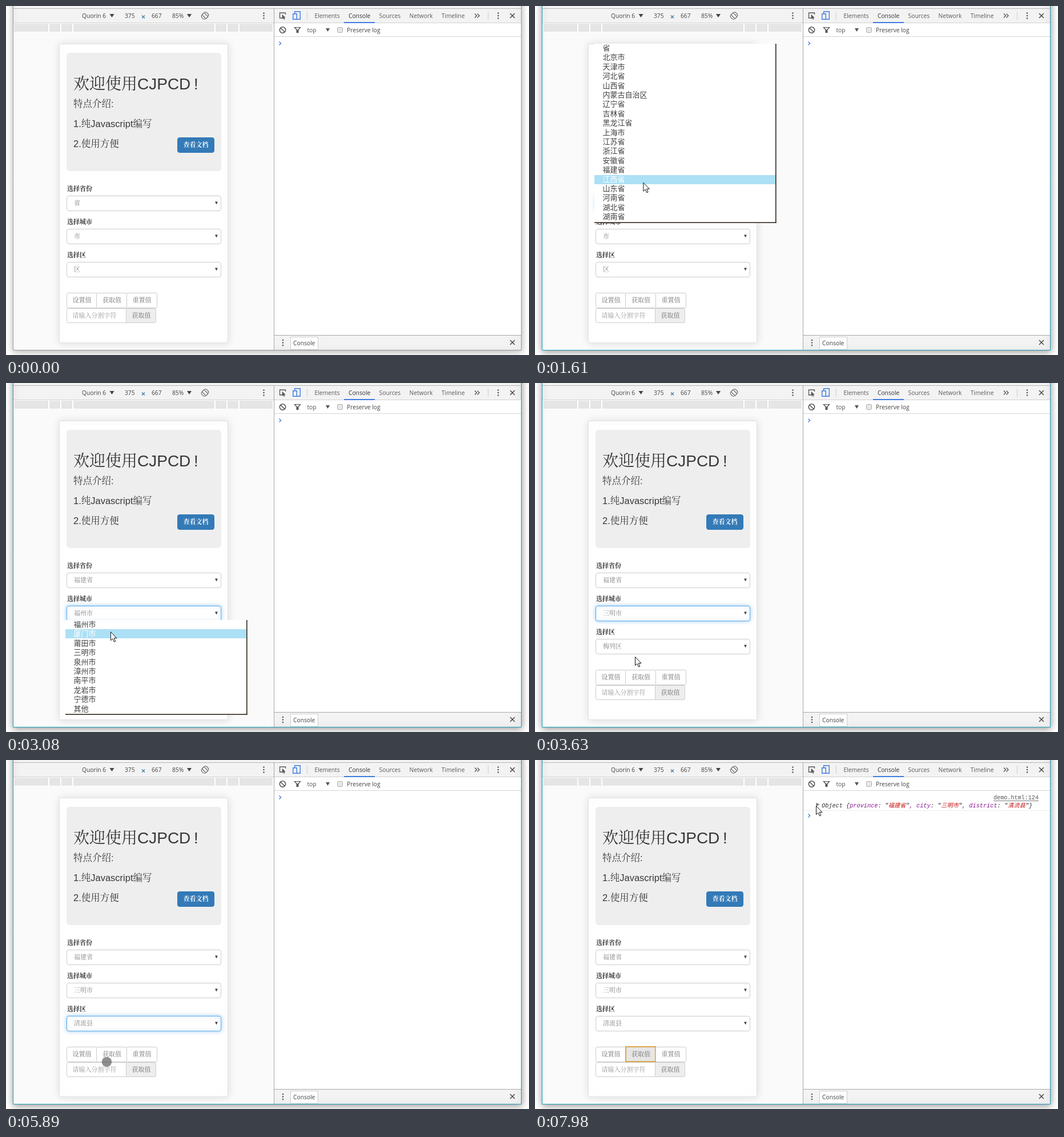
These frames come from a looping animation (916 by 611 pixels, 8 s). An HTML page with a canvas:

```html
<!DOCTYPE html>
<html lang="zh">
<head>
<meta charset="utf-8">
<title>CJPCD demo</title>
<style>
html, body { margin: 0; width: 100%; height: 100%; overflow: hidden; background: #fff; }
canvas { display: block; }
</style>
</head>
<body>
<canvas id="stage" width="916" height="611"></canvas>
<script>
const ctx = document.getElementById('stage').getContext('2d');
const LOOP = 8000, ROW = 16.4, GREY = '#555', BLUE = '#3f7be0';
const UI = '"Open Sans", "Noto Sans", sans-serif';
const PAGE = '"Liberation Sans", "Noto Serif CJK SC", "Noto Sans CJK SC", sans-serif';
const LIST = '"Noto Sans CJK SC", sans-serif';
const MONO = '"Liberation Mono", "Noto Sans CJK SC", monospace';

// Each select is focused, shows its list after a short delay, and closes when an option is picked.
const fields = [
  { label: '选择省份', focus: 920, pick: 2080, top: 66, textDelay: 240,
    values: ['省', '福建省', '福建省', '福建省'],
    items: '省 北京市 天津市 河北省 山西省 内蒙古自治区 辽宁省 吉林省 黑龙江省 上海市 江苏省 浙江省 安徽省 福建省 江西省 山东省 河南省 湖北省 湖南省' },
  { label: '选择城市', focus: 2910, pick: 3630, top: 415, textDelay: 0,
    values: ['市', '福州市', '三明市', '三明市'],
    items: '福州市 厦门市 莆田市 三明市 泉州市 漳州市 南平市 龙岩市 宁德市 其他' },
  { label: '选择区', focus: 4480, pick: 5030, top: 264, textDelay: 0,
    values: ['区', '鼓楼区', '梅列区', '清流县'],
    items: '梅列区 三元区 永安市 明溪县 将乐县 大田县 宁化县 建宁县 沙县 尤溪县 清流县 泰宁县 其他' }
];
const ENTER = 70, GET_VALUE = 6820, OPEN_DELAY = 80;

// Pointer glides: start, end, x, y
const glides = [
  [ENTER, 840, 188, 360], [920, 1170, 184, 353], [1250, 1840, 192, 288], [2080, 2380, 188, 408],
  [2910, 3310, 175, 480], [3770, 4240, 177, 456], [4480, 4860, 176, 431], [5030, 5570, 278, 526],
  [5740, 5890, 176.5, 528.5], [5980, 6270, 181, 520], [7290, 7980, 492, 81]
];

function fill(x, y, w, h, color) {
  ctx.fillStyle = color;
  ctx.fillRect(x, y, w, h);
}

function box(x, y, w, h, radius, color, border, weight = 1) {
  ctx.beginPath();
  ctx.roundRect(x + weight / 2, y + weight / 2, w - weight, h - weight, radius);
  ctx.fillStyle = color;
  ctx.fill();
  ctx.strokeStyle = border;
  ctx.lineWidth = weight;
  ctx.stroke();
}

function text(str, x, y, size, color, family = PAGE, style = '') {
  ctx.font = `${style} ${size}px ${family}`;
  ctx.fillStyle = color;
  ctx.fillText(str, x, y);
  return x + ctx.measureText(str).width;
}

const uiText = (str, x, y, color = '#444') => text(str, x, y, 10.25, color, UI);

function trace(points) {
  ctx.beginPath();
  for (let i = 0; i < points.length; i += 2) ctx.lineTo(points[i], points[i + 1]);
}

function line(color, width, ...points) {
  trace(points);
  ctx.strokeStyle = color;
  ctx.lineWidth = width;
  ctx.stroke();
}

function shape(color, ...points) {
  trace(points);
  ctx.closePath();
  ctx.fillStyle = color;
  ctx.fill();
}

function disc(x, y, r, color) {
  ctx.beginPath();
  ctx.arc(x, y, r, 0, 7);
  ctx.fillStyle = color;
  ctx.fill();
}

function arrow(x, y, scale, color, border) {
  ctx.save();
  ctx.translate(x, y);
  ctx.scale(scale, scale);
  shape(color, 0, 0, 0, 15, 3.4, 12, 6, 17.5, 8.2, 16.5, 5.8, 11, 10.5, 11);
  ctx.strokeStyle = border;
  ctx.lineWidth = 1;
  ctx.stroke();
  ctx.restore();
}

const triangle = (x, y, w, h, color) => shape(color, x - w / 2, y - h / 2, x + w / 2, y - h / 2, x, y + h / 2);
const chevron = (x, y, r, color) => line(color, 1.4, x, y - r, x + r, y, x, y + r);
const dots = (x, y) => [-4.5, 0, 4.5].forEach(d => disc(x, y + d, 1.3, GREY));

function cross(x, y, r, color) {
  line(color, 1.5, x - r, y - r, x + r, y + r);
  line(color, 1.5, x + r, y - r, x - r, y + r);
}

function drawWindow(active) {
  fill(0, 0, 916, 611, '#fff');
  ctx.save();
  ctx.shadowColor = `rgba(0,0,0,${active ? .42 : .3})`;
  ctx.shadowBlur = 12;
  ctx.shadowOffsetY = 2;
  box(12, -20, 891, 623, 0, '#f3f3f3', active ? '#1c9fb8' : '#9b9b9b');
  ctx.restore();
  fill(13, 29, 456, 573, '#fafafa');
  fill(470, 29, 432, 547, '#fff');
  fill(13, 4, 889, 1, '#b5b5b5');
  fill(13, 29, 889, 1, '#d0d0d0');
  fill(470, 53, 432, 1, '#d5d5d5');
  fill(469, 4, 1, 598, '#a8a8a8');
  fill(470, 576, 432, 1, '#a8a8a8');
}

function drawDeviceBar() {
  uiText('Quorin 6', 133, 21);
  triangle(185.5, 17, 8, 6, '#444');
  uiText('375', 208, 21);
  cross(240.5, 19, 2.5, '#4b86a8');
  uiText('667', 255, 21);
  uiText('85%', 291, 21);
  triangle(321, 17, 8, 6, '#444');
  ctx.save();
  ctx.translate(348.5, 17);
  ctx.rotate(-Math.PI / 4);
  ctx.strokeStyle = GREY;
  ctx.lineWidth = 1.1;
  ctx.strokeRect(-2.5, -5, 5, 10);
  for (const side of [0, Math.PI]) {
    ctx.beginPath();
    ctx.arc(0, 0, 6.3, side - .9, side + .9);
    ctx.stroke();
  }
  ctx.restore();
  dots(451.5, 17);

  // Ruler with symmetric breakpoints
  fill(13, 30, 456, 16, '#fff');
  fill(14, 31, 453, 14, '#e5e5e5');
  for (let d = 125; d < 180; d += 21) {
    fill(241 - d, 31, 2, 14, '#fff');
    fill(240 + d, 31, 2, 14, '#fff');
  }
}

function drawDevtools() {
  line(GREY, 1.3, 484, 21, 479.5, 21, 479.5, 12, 489.5, 12, 489.5, 15);
  arrow(484, 15, .5, GREY, GREY);
  box(505, 9, 11, 15, 0, '#f3f3f3', BLUE, 1.4);
  box(502, 13, 8, 11, 0, '#f3f3f3', BLUE, 1.4);
  let x = 540.5;
  for (const tab of ['Elements', 'Console', 'Sources', 'Network', 'Timeline'])
    x = uiText(tab, x, 21, tab === 'Console' ? '#333' : '#5a5a5a') + 15.3;
  fill(592, 28, 54, 2, BLUE);
  chevron(821, 17, 3.5, GREY);
  chevron(825.5, 17, 3.5, GREY);
  for (const bar of [527, 844]) fill(bar, 10, 1, 14, '#ccc');
  dots(862, 17);
  cross(887, 17, 4, '#444');

  box(478.5, 36, 12, 12, 6, '#fff', GREY, 1.6);
  line(GREY, 1.6, 481, 38.5, 488, 45.5);
  triangle(510.5, 40.5, 13, 7, GREY);
  fill(508.5, 42, 4, 5, GREY);
  triangle(510.5, 40, 7, 4, '#fff');
  uiText('top', 527.5, 46, GREY);
  triangle(563.5, 42, 7, 6, GREY);
  box(580, 37, 10, 10, 2, '#e8e8e8', '#aaa');
  uiText('Preserve log', 597, 46);

  dots(485, 589.5);
  box(498, 579, 49, 23, 0, '#fff', '#ccc');
  uiText('Console', 503, 594);
  cross(887, 589, 4, '#444');
}

function drawConsole(logged) {
  chevron(478.5, logged ? 97.5 : 65.5, 3, BLUE);
  if (!logged) return;
  text('demo.html:124', 803, 69, 10.15, GREY, MONO);
  fill(803, 71, 79, 1, '#777');
  shape('#6e6e6e', 492.5, 75, 498.5, 78, 492.5, 81);
  let x = 502;
  const part = (str, color = '#333') => { x = text(str, x, 83, 10.25, color, MONO, 'italic'); };
  part('Object {');
  ['province', 'city', 'district'].forEach((key, i) => {
    part((i ? ', ' : '') + key, '#881391');
    part(': "');
    part(fields[i].values[3], '#c41a16');
    part('"');
  });
  part('}');
  fill(470, 88, 432, 1, '#ededed');
}

function drawSelect(y, label, value, focused) {
  text(label, 107, y - 8, 11, '#333', PAGE, 'bold');
  ctx.save();
  if (focused) { ctx.shadowColor = 'rgba(102,175,233,.7)'; ctx.shadowBlur = 6; }
  box(106, y, 271, 27, 3.5, '#fff', focused ? '#66afe9' : '#ccc');
  ctx.restore();
  text(value, 119, y + 17, 11, '#808080');
  triangle(368.5, y + 13, 5, 5, '#444');
}

function drawPage(t) {
  ctx.save();
  ctx.shadowColor = 'rgba(0,0,0,.12)';
  ctx.shadowBlur = 14;
  box(93, 66, 296, 524, 0, '#fff', '#e2e2e2');
  ctx.restore();
  box(106, 82, 271, 207, 5, '#eee', '#eee');
  text('欢迎使用CJPCD', 118, 146, 28, '#383838', PAGE, '300');
  text('!', 329, 146, 28, '#383838');
  ['特点介绍:', '1.纯Javascript编写', '2.使用方便']
    .forEach((str, i) => text(str, 118, 177 + 35 * i, 16.5, '#383838', PAGE, '300'));
  box(300, 230, 65, 27, 3.5, '#337ab7', '#337ab7');
  text('查看文档', 310.5, 247, 11, '#fff', PAGE, 'bold');

  const picks = fields.filter(f => t >= f.pick).length;
  fields.forEach((f, i) => {
    const blur = fields[i + 1]?.focus ?? GET_VALUE;
    drawSelect(332 + 58 * i, f.label, f.values[picks], t >= f.focus && t < blur);
  });

  ['设置值', '获取值', '重置值'].forEach((str, i) => {
    const x = 106 + 52.5 * i;
    box(Math.floor(x), 502, 54, 27, 2, '#fff', '#ccc');
    if (i === 1 && t >= GET_VALUE) box(158, 501, 54, 28, 0, '#e6e6e6', '#d9a94e', 2);
    text(str, x + 10.5, 519, 11, '#707070');
  });
  box(106, 529, 157, 26, 3, '#fff', '#ccc');
  box(210, 529, 53, 26, [0, 3, 3, 0], '#eee', '#ccc');
  text('请输入分割字符', 116.5, 546, 11, '#999');
  text('获取值', 220.5, 546, 11, '#707070');
}

function drawPopup({ top, items, focus, textDelay }, t, pointerY) {
  const rows = items.split(' ');
  const height = Math.round(rows.length * ROW + 2);
  fill(104, top, 318, height, '#fff');
  fill(421, top, 1.6, height, '#33291c');
  if (t < focus + OPEN_DELAY + textDelay) return;
  fill(104, top + height - 1.6, 318.6, 1.6, '#33291c');
  const hovered = Math.floor((pointerY - top) / ROW);
  rows.forEach((item, i) => {
    const y = Math.round(top + i * ROW);
    if (i === hovered) fill(104, y, 317, 16, '#ace0f5');
    text(item, 118.5, y + 11.5, 13, i === hovered ? '#fff' : '#404040', LIST, '300');
  });
}

function pointerAt(t) {
  let x = 641, y = 547;
  for (const [start, end, toX, toY] of glides) {
    const k = Math.min(1, Math.max(0, (t - start) / (end - start)));
    const eased = k * k * (3 - 2 * k);
    x += (toX - x) * eased;
    y += (toY - y) * eased;
  }
  return [x, y];
}

function draw(t) {
  drawWindow(t >= fields[0].focus);
  drawDeviceBar();
  drawDevtools();
  drawConsole(t >= GET_VALUE + OPEN_DELAY);
  drawPage(t);
  if (t < ENTER) return;
  const [x, y] = pointerAt(t);
  const popup = fields.find(f => t >= f.focus + OPEN_DELAY && t < f.pick);
  if (popup) drawPopup(popup, t, y);
  // The pointer becomes a touch dot over the page, shortly after a list closes.
  const overList = popup || fields.some(f => t >= f.pick && t < f.pick + OPEN_DELAY);
  if (!overList && x > 94 && x < 388) disc(x, y, 8.7, 'rgba(90,90,90,.68)');
  else arrow(x + .5, y - .5, 1, '#fff', '#111');
}

function tick() {
  draw(performance.now() % LOOP);
  requestAnimationFrame(tick);
}
tick();
</script>
</body>
</html>
```
